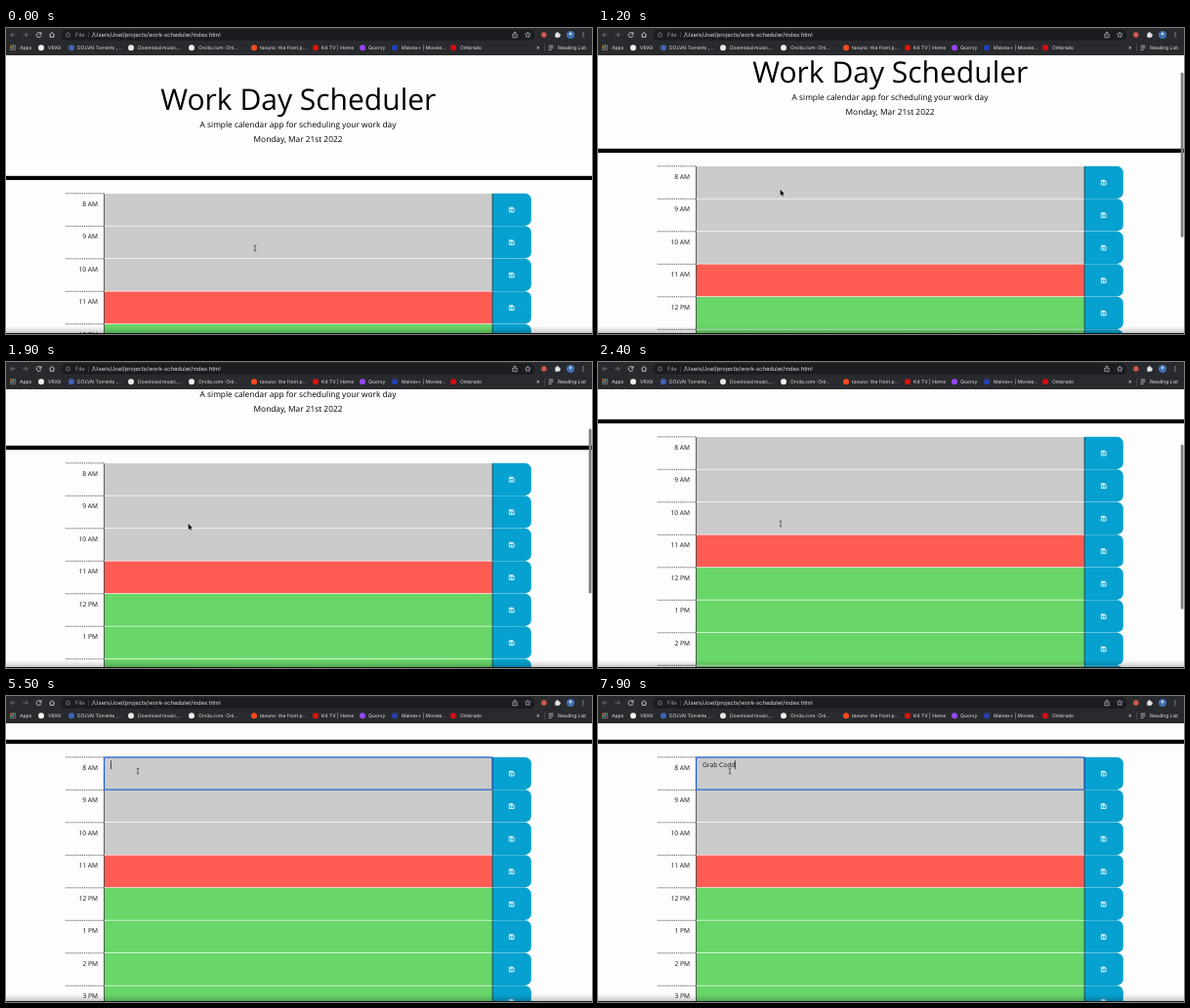
Write an HTML page with a canvas that moves like this. It is 600 by 314 pixels and loops after 8000 ms.

```html
<!DOCTYPE html>
<html lang="en">
<head>
<meta charset="utf-8">
<title>Work Day Scheduler</title>
<style>
  html, body { margin: 0; width: 100%; height: 100%; overflow: hidden; background: #fdfdfd; }
  canvas { display: block; width: 600px; height: 314px; }
</style>
</head>
<body>
<canvas id="stage"></canvas>
<script>
const W = 600, H = 314, LOOP = 8000, STEP = 100;
const canvas = document.getElementById('stage');
const ratio = window.devicePixelRatio || 1;
canvas.width = W * ratio;
canvas.height = H * ratio;
const ctx = canvas.getContext('2d');
ctx.scale(ratio, ratio);

const PAGE_FONT = '"Open Sans", sans-serif';
const UI_FONT = 'Inter, sans-serif';
const PAGE_TOP = 28, ROW_TOP = 170, ROW_HEIGHT = 33.5;
const PAST = '#cbcbcb', PRESENT = '#ff5d54', FUTURE = '#69d669', SAVE = '#06a1d0';

// Each key is [time, value, ...]; values between keys are linear.
const SCROLL = [[900, 0], [1000, 10], [1200, 28], [1400, 38], [1600, 43.5],
  [1800, 54], [2000, 78], [2200, 93], [2400, 93], [2600, 102], [2900, 107]];
const POINTER = [[0, 255, 226], [200, 250, 222], [500, 215, 192], [800, 188, 168],
  [900, 187, 166], [2600, 187, 166], [2900, 155, 110], [3200, 135, 77]];
const TYPING = [[5900, 'G'], [6000, 'Gr'], [6200, 'Gra'], [6300, 'Grab'], [7100, 'Grab '],
  [7200, 'Grab C'], [7300, 'Grab Co'], [7400, 'Grab Cod'], [7500, 'Grab Codd']];
const CLICK = 3300, BLINK = 500;

const BOOKMARKS = [
  [36, '#f2f2f2', 43, 'VRX9'],
  [67, '#3c66b8', 73, 'DOLVN Torrents ,...'],
  [128, '#e8e8e8', 135, 'Download music,...'],
  [190, '#f0f0f0', 197, 'Orvila.com: Onl...'],
  [254, '#ff4a1c', 260, 'tavuno: the front p...'],
  [317, '#d8150e', 323, 'K4 TV | Home'],
  [365, '#9347ff', 371, 'Quorvy'],
  [398, '#2440b4', 405, 'Malvex+ | Movies...'],
  [458, '#d50d18', 465, 'Ombrado']
];

function sample(keys, t) {
  if (t <= keys[0][0]) return keys[0].slice(1);
  for (let i = 1; i < keys.length; i++) {
    const a = keys[i - 1], b = keys[i];
    if (t <= b[0]) {
      const k = (t - a[0]) / (b[0] - a[0]);
      return a.slice(1).map((v, j) => v + (b[j + 1] - v) * k);
    }
  }
  return keys[keys.length - 1].slice(1);
}

function rect(x, y, w, h, fill) {
  ctx.fillStyle = fill;
  ctx.fillRect(x, y, w, h);
}

function rounded(x, y, w, h, radius, fill) {
  ctx.fillStyle = fill;
  ctx.beginPath();
  ctx.roundRect(x, y, w, h, radius);
  ctx.fill();
}

function dot(x, y, r, fill) {
  ctx.fillStyle = fill;
  ctx.beginPath();
  ctx.arc(x, y, r, 0, Math.PI * 2);
  ctx.fill();
}

function stroke(path, color, width) {
  ctx.strokeStyle = color;
  ctx.lineWidth = width;
  ctx.stroke(new Path2D(path));
}

function text(str, x, y, size, fill, font = UI_FONT, align = 'left') {
  ctx.font = `${size}px ${font}`;
  ctx.textAlign = align;
  ctx.fillStyle = fill;
  ctx.fillText(str, x, y);
}

function drawToolbar() {
  const light = '#e4e5e7', dim = '#7c7e82';
  rect(0, 0, W, PAGE_TOP, '#292a2d');
  stroke('M9.5 7H4.8M7 4.8L4.8 7L7 9.2', dim, .8);
  stroke('M17.5 7H22.2M20 4.8L22.2 7L20 9.2', dim, .8);
  stroke('M35.4 5.4A2.4 2.4 0 1 0 36 7.5M36 4.2V6.2H34', light, .8);
  stroke('M44.4 7L47 4.6L49.6 7M45.2 6.7V9.4H48.8V6.7', light, .8);

  rounded(56.5, 1.4, 485, 11.4, 5.7, '#1b1c1f');
  stroke('M61.3 7a2.2 2.2 0 1 0 4.4 0a2.2 2.2 0 1 0 -4.4 0M63.5 6.7V8.2M63.5 5.5V6', '#a0a3a7', .5);
  text('File', 71, 9, 5.83, '#9a9da1');
  rect(84, 4, .5, 6, '#5c5e62');
  text('/Users/Joel/projects/work-scheduler/index.html', 88, 9, 5.83, light);
  stroke('M519.8 6H518.8V9.7H523.2V6H522.2M521 8V4M519.8 5.1L521 3.9L522.2 5.1', light, .6);
  stroke('M534.3 4.1L535.1 6L537.1 6.2L535.6 7.5L536 9.5L534.3 8.4L532.6 9.5L533 7.5L531.5 6.2L533.5 6Z', light, .55);

  dot(550.8, 7, 2.7, '#d9574c');
  rounded(562.3, 5.3, 4.6, 4.4, .6, light);
  dot(564.6, 5, 1, light);
  dot(567, 7.5, 1, light);
  dot(578, 7, 4, '#3d6fb5');
  dot(578, 6, 1.4, '#c8d4e6');
  for (let i = -1; i <= 1; i++) dot(591, 7 + i * 2, .6, light);

  const appColors = ['#e25241', '#e8a53a', '#55a85b', '#4a86e2'];
  for (let i = 0; i < 9; i++) {
    const col = i % 3, row = Math.floor(i / 3);
    rect(4.4 + col * 2.1, 17.4 + row * 2.1, 1.5, 1.5, appColors[(col + row) % 4]);
  }
  text('Apps', 14, 22, 5, light);
  for (const [iconX, color, textX, label] of BOOKMARKS) {
    dot(iconX, 20.3, 3, color);
    text(label, textX, 22, 5, light);
  }
  text('»', 543, 22.2, 6, light);
  rect(551, 16.5, .5, 7.5, '#5c5e62');
  stroke('M555.7 18.2H560.3M555.7 20.3H560.3M555.7 22.4H558.5', light, .75);
  text('Reading List', 565, 22, 5, light);
}

function drawSaveIcon(x, y) {
  stroke(`M${x - 2.4} ${y - 2.4}H${x + 1.3}L${x + 2.4} ${y - 1.3}V${y + 2.4}H${x - 2.4}Z`, '#fff', .8);
  rect(x - 1.5, y - 2, 2.7, 1.4, '#fff');
  dot(x, y + .9, .85, '#fff');
}

function drawRow(index, y) {
  const hour = index + 8;
  const label = `${(hour - 1) % 12 + 1} ${hour < 12 ? 'AM' : 'PM'}`;
  const fill = index < 3 ? PAST : index === 3 ? PRESENT : FUTURE;
  ctx.setLineDash([1.25, .85]);
  stroke(`M61 ${y - .2}H100`, '#222', .7);
  ctx.setLineDash([]);
  text(label, 94, y + 12.7, 6.67, '#111', PAGE_FONT, 'right');
  rect(100.5, y, 397.5, ROW_HEIGHT - .7, fill);
  rect(100.1, y, .7, ROW_HEIGHT - .4, '#222');
  rounded(498, y - .2, 39.8, ROW_HEIGHT - .4, [0, 6.25, 6.25, 0], SAVE);
  rect(497.7, y, .7, ROW_HEIGHT - .4, '#222');
  drawSaveIcon(517.7, y + 16.6);
}

function drawEditor(t, y) {
  if (t < CLICK) return;
  ctx.strokeStyle = '#1a61c6';
  ctx.lineWidth = 1.2;
  ctx.beginPath();
  ctx.roundRect(100.5, y - .1, 397.6, 33.2, .8);
  ctx.stroke();

  let typed = '', since = CLICK;
  for (const [time, value] of TYPING) {
    if (t >= time) [since, typed] = [time, value];
  }
  text(typed, 107, y + 10.3, 6.67, '#111', PAGE_FONT);
  const caretOn = Math.floor((t - since) / BLINK) % 2 === 0;
  if (caretOn) rect(107 + ctx.measureText(typed).width, y + 3.2, .7, 8.8, '#111');
}

function drawPage(t, scroll) {
  ctx.save();
  ctx.beginPath();
  ctx.rect(0, PAGE_TOP, W, H - PAGE_TOP);
  ctx.clip();
  rect(0, PAGE_TOP, W, H - PAGE_TOP, '#fdfdfd');
  ctx.translate(0, -scroll);
  text('Work Day Scheduler', 299.3, 84.4, 30, '#000', PAGE_FONT, 'center');
  text('A simple calendar app for scheduling your work day', 299, 102.3, 8.33, '#000', PAGE_FONT, 'center');
  text('Monday, Mar 21st 2022', 299, 117.2, 8.33, '#000', PAGE_FONT, 'center');
  rect(0, 151.8, W, 4.2, '#000');
  for (let i = 0; i < 10; i++) drawRow(i, ROW_TOP + i * ROW_HEIGHT);
  drawEditor(t, ROW_TOP);
  ctx.restore();
}

function drawScrollbar(t, scroll) {
  if (t < 1000) return;
  ctx.globalAlpha = Math.max(0, Math.min(1, (3600 - t) / 300));
  rounded(596.7, 29 + scroll * .6, 2.8, 169, 1.4, '#7d7d7d');
  ctx.globalAlpha = 1;
}

function drawPointer(t) {
  const [x, y] = sample(POINTER, t);
  if (t >= 1000 && t < 2400) {
    const arrow = new Path2D('M0 0V6.2L1.4 4.9L2.4 7L3.4 6.5L2.5 4.5H4.4Z');
    ctx.save();
    ctx.translate(x - .4, y - .2);
    ctx.strokeStyle = '#fff';
    ctx.lineWidth = .9;
    ctx.stroke(arrow);
    ctx.fillStyle = '#000';
    ctx.fill(arrow);
    ctx.restore();
    return;
  }
  const beam = `M${x - 1.3} ${y - 3}Q${x} ${y - 3} ${x} ${y - 2}V${y + 2}Q${x} ${y + 3} ${x - 1.3} ${y + 3}` +
    `M${x + 1.3} ${y - 3}Q${x} ${y - 3} ${x} ${y - 2}M${x} ${y + 2}Q${x} ${y + 3} ${x + 1.3} ${y + 3}`;
  stroke(beam, 'rgba(255,255,255,.5)', 1.4);
  stroke(beam, '#222', .75);
}

function drawBottomEdge() {
  const shade = ctx.createLinearGradient(0, 306, 0, 313);
  shade.addColorStop(0, 'rgba(0,0,0,0)');
  shade.addColorStop(1, 'rgba(0,0,0,.2)');
  rect(0, 306, W, 7, shade);
  rect(0, 313, W, 1, '#151515');
}

function render(now) {
  const t = Math.floor(now % LOOP / STEP) * STEP;
  const [scroll] = sample(SCROLL, t);
  ctx.textRendering = 'geometricPrecision';
  drawPage(t, scroll);
  drawScrollbar(t, scroll);
  drawBottomEdge();
  drawToolbar();
  drawPointer(t);
}

const start = performance.now();
function tick() {
  render(performance.now() - start);
  requestAnimationFrame(tick);
}
tick();
</script>
</body>
</html>
```
